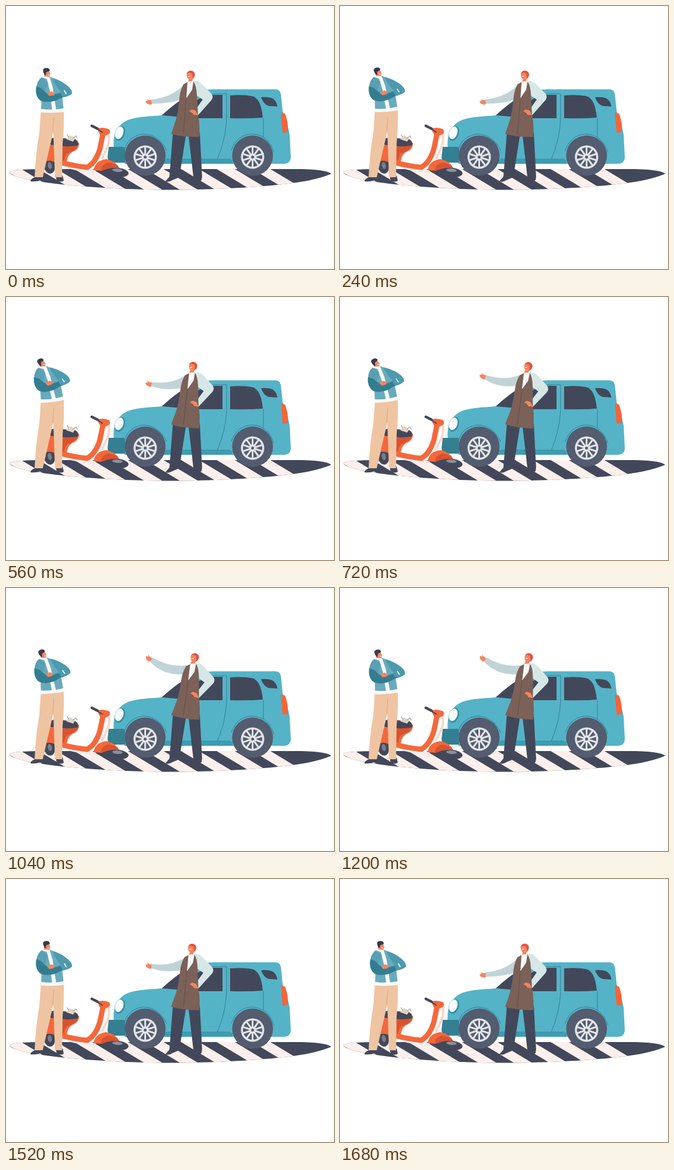
Write an HTML page with a canvas that moves like this. It is 562 px wide and 450 px high and loops after 1.76 s.

```html
<!DOCTYPE html>
<html lang="en">
<head>
<meta charset="utf-8">
<title>Roadside dispute</title>
<style>
html, body { margin: 0; width: 100%; height: 100%; overflow: hidden; background: #fff; }
canvas { display: block; }
</style>
</head>
<body>
<canvas id="stage" width="562" height="450"></canvas>
<script>
const ctx = document.getElementById('stage').getContext('2d');
const LOOP = 1760, STEP = 80;
const DARK = '#42485a', TEAL = '#55b3c7', SEAM = '#347f95', ORANGE = '#f4683c',
  RUST = '#d9532f', SKIN = '#f2855f', PALE = '#fdefeb', TAN = '#efc4a2',
  TYRE = '#545c6f', RIM = '#e2e4e8', WHITE = '#f8fafa';

function fill(color, d) {
  ctx.fillStyle = color;
  ctx.fill(new Path2D(d));
}
function line(color, width, d) {
  ctx.strokeStyle = color;
  ctx.lineWidth = width;
  ctx.lineCap = ctx.lineJoin = 'round';
  ctx.stroke(new Path2D(d));
}
function oval(color, x, y, rx, ry = rx, turn = 0) {
  ctx.fillStyle = color;
  ctx.beginPath();
  ctx.ellipse(x, y, rx, ry, turn, 0, Math.PI * 2);
  ctx.fill();
}
function turned(x, y, degrees, draw, rise = 0) {
  ctx.save();
  ctx.translate(x, y - rise);
  ctx.rotate(degrees * Math.PI / 180);
  ctx.translate(-x, -y);
  draw();
  ctx.restore();
}
function ramp(t, from, to) {
  const u = Math.min(1, Math.max(0, (t - from) / (to - from)));
  return u * u * (3 - 2 * u);
}
const mix = (a, b, u) => a + (b - a) * u;

function drawRoad() {
  ctx.save();
  ctx.clip(new Path2D('M6 284C12 279 45 279 80 279H500C535 279 553 283 557 287C545 293 515 301 475 305C420 311 350 314.5 285 314.5C205 314.5 110 309 48 299C22 294 6 289 6 284Z'));
  fill(DARK, 'M0 270H562V320H0Z');
  for (let x = 52; x < 500; x += 61)
    fill(PALE, `M${x - 57} 279H${x - 26}L${x + 33} 314.5H${x + 2}Z`);
  ctx.restore();
}

function drawWheel(x, y) {
  oval(TYRE, x, y - 2.5, 35, 34.5);
  oval(RIM, x, y, 20);
  oval(TYRE, x, y, 16.5);
  for (let i = 0; i < 10; i++)
    turned(x, y, i * 36, () => line(RIM, 3, `M${x} ${y}V${y - 17}`));
  oval(RIM, x, y, 6);
  oval(TYRE, x, y, 2.5);
}

function drawCar() {
  fill(TEAL, 'M185 244C182 222 190 203 209 195C226 189 247 189 267 187C285 173 301 159 320 149Q334 142.5 357 142.5H462Q470 143 471 151L474 180Q482 199 486 220L488 259Q487 270 476 270H203V244Z');
  // glazing
  fill(DARK, 'M267 187C281 174 296 162 313 153L300 190L278 188Z');
  fill(DARK, 'M314 192V170Q336 152 358 152H371V192Z');
  fill(DARK, 'M384 153Q405 151 421 154Q437 157 440 191Q414 193 384 192Z');
  fill(DARK, 'M437 156Q451 155 458 159Q464 164 465 172L450 171Q441 168 437 156Z');
  // panel seams
  line(SEAM, 1, 'M340 151Q348 150 378 150V194Q376 230 362 262H275');
  line(SEAM, 1, 'M441 192V224M384 262H362');
  fill('#3c9db2', 'M270 263H388V270H270Z');
  line(SEAM, 1, 'M203 247Q207 224 234 219Q262 219 275 247M386 247Q396 219 423 219Q450 221 459 250');
  fill('#f2653b', 'M471 182L478 184Q484 198 483 216L474 217Z');
  oval('#378da2', 195, 218, 8.5, 13, .35);
  oval('#f6fbfc', 194, 217, 7, 11, .35);
  fill('#347f91', 'M176 241H201Q204 241 204 246V268H182Q174 267 174 258Z');
  drawWheel(238.5, 258.5);
  drawWheel(422.5, 258.5);
}

function drawScooter() {
  oval(DARK, 74, 272, 10, 15, -.2);
  oval('#777e8b', 75, 273, 3.5, 6, -.2);
  oval(DARK, 186, 285, 24, 9, .06);
  oval('#8a909b', 191, 281, 9, 3, .08);
  line('#eceef1', 4, 'M98 273Q122 282 152 283');
  line('#f9d7cb', 4, 'M176 219Q178 230 174 241L165 260');
  fill(ORANGE, 'M68 266Q66 241 82 234H125Q126 245 113 250Q104 256 104 270L88 272Q80 262 68 266Z');
  fill(RUST, 'M94 241Q115 238 123 240Q117 249 104 252Q99 260 99 270L91 271Z');
  line(ORANGE, 9, 'M95 268Q118 274 139 276Q154 268 161 244L167 215');
  fill(ORANGE, 'M150 281Q153 264 172 262Q188 265 194 277Q176 276 164 282Z');
  fill(RUST, 'M174 268Q186 268 194 277Q178 275 163 282Q162 272 174 268Z');
  fill(ORANGE, 'M156 210Q166 206 177 211Q180 216 176 219L164 225L160 218Z');
  line(DARK, 4.5, 'M147 205L157 210');
  line(DARK, 2, 'M156 210L165 216');
  fill(DARK, 'M74 231Q78 222 96 226L119 228Q126 233 123 239Q98 242 74 237Z');
  fill('#e5d3be', 'M103 228L109 221L119 226L115 232Z');
  line('#777e8b', 1, 'M107 224L105 220M115 226L120 222L122 226');
}

function drawManLegs() {
  fill(DARK, 'M49 290H61V297Q54 301 42 300Q41 297 49 293Z');
  fill(DARK, 'M85 290H97L99 299Q94 302 87 299Z');
  fill(TAN, 'M60 176H99Q100 207 97 235L96 293H84L81 215L63 293H49Q51 250 57 218Z');
  line('#d9a880', 1, 'M80 215L82 190');
}

function drawMan(lean) {
  turned(80, 182, -5.5 * lean, () => {
    turned(70, 124, -15 * lean, () => {
      fill(SKIN, 'M66 111H74L76 117L74 121L72 121V127H65Z');
      fill('#353b4b', 'M64 113Q62 106 69 106Q75 106 75 111Q70 113 69 113L68 118H66Z');
      line('#fff', 1, 'M72 118H74');
    });
    fill('#69aabd', 'M59 124Q68 118 78 122Q88 126 95 141L99 180H60L61 155Z');
    fill(WHITE, 'M61 122Q69 119 75 122L80 139L86 178H79L75 145L70 125Z');
    fill('#4d9aae', 'M80 123Q94 127 106 137Q114 144 113 150Q108 156 83 159L78 152L94 147Q86 139 80 123Z');
    fill('#5a9fb2', 'M61 122Q53 128 52 140Q51 152 58 160L70 155L66 147L72 131Z');
    fill('#347d91', 'M52 137Q49 153 58 161Q67 167 85 162L97 156L93 149L78 153Q67 149 61 141Z');
    fill(SKIN, 'M70 149L78 146L84 149L81 153L74 154Z');
    line('#eef6f7', 2, 'M100 145L103 150');
    fill(WHITE, 'M60 176Q78 179 99 175L100 181Q80 184 60 182Z');
  }, 3 * lean);
}

function drawArm(raise) {
  const at = (x0, y0, x1, y1) => `${mix(x0, x1, raise)} ${mix(y0, y1, raise)}`;
  const sleeve = `M${at(303, 137, 310, 132)}Q${at(281, 157, 282, 137)} ${at(249, 160, 251, 119)}` +
    `L${at(250, 167, 247, 126)}Q${at(277, 168, 268, 150)} ${at(303, 159, 308, 148)}Z`;
  ctx.save();
  ctx.translate(mix(250, 249, raise), mix(164, 122.5, raise));
  ctx.rotate(.5 * raise);
  fill(SKIN, 'M1 -3L-5 -3L-9 -5L-7 -2L-11 -1L-9 3L-3 5L1 3Z');
  ctx.restore();
  fill('#c1d3d6', sleeve);
}

function drawWoman(lean, raise) {
  fill(DARK, 'M286 216H332L336 292L335 298Q329 302 325 298L321 292L313 223H308L297 293L285 298Q279 302 273 300L280 292Z');
  drawArm(raise);
  turned(308, 218, 3 * lean, () => {
    fill('#d7e7e8', 'M321 128Q329 127 335 133L352 150Q356 156 352 161L329 187L323 180L337 160L325 152Z');
    turned(316, 126, 12 * lean, () => {
      oval('#e2513f', 316.5, 117, 7, 6.5);
      fill('#e2513f', 'M319 113Q325 113 323 121L319 126L315 121Z');
      fill(SKIN, 'M310 116Q312 113 318 115L320 120L319 131L312 130L313 125Q309 123 310 116Z');
      line('#fff', 1, 'M312 121L315 120');
    });
    fill(WHITE, 'M309 131Q315 128 321 129L320 147L309 158L306 145Z');
    fill('#7b6158', 'M311 130L304 134Q298 145 297 159Q295 181 291 195L283 219Q306 225 331 224Q333 205 329 187L327 151Q326 135 321 129L319 143L309 158Z');
    line('#655248', 1, 'M309 158L304 219M318 184L326 186');
    fill(SKIN, 'M329 187L325 179L318 177L314 180L319 183L321 186Z');
  });
}

function draw(now) {
  const t = Math.floor((now % LOOP) / STEP) * STEP;
  const manLean = ramp(t, 0, 440) - ramp(t, 840, 1520);
  const drop = ramp(t, 1280, 1680);
  const womanLean = ramp(t, 160, 880) - drop;
  const raise = ramp(t, 240, 1040) - drop;

  ctx.fillStyle = '#fff';
  ctx.fillRect(0, 0, 562, 450);
  drawRoad();
  drawCar();
  drawScooter();
  drawManLegs();
  drawMan(manLean);
  drawWoman(womanLean, raise);
  requestAnimationFrame(draw);
}
requestAnimationFrame(draw);
</script>
</body>
</html>
```
